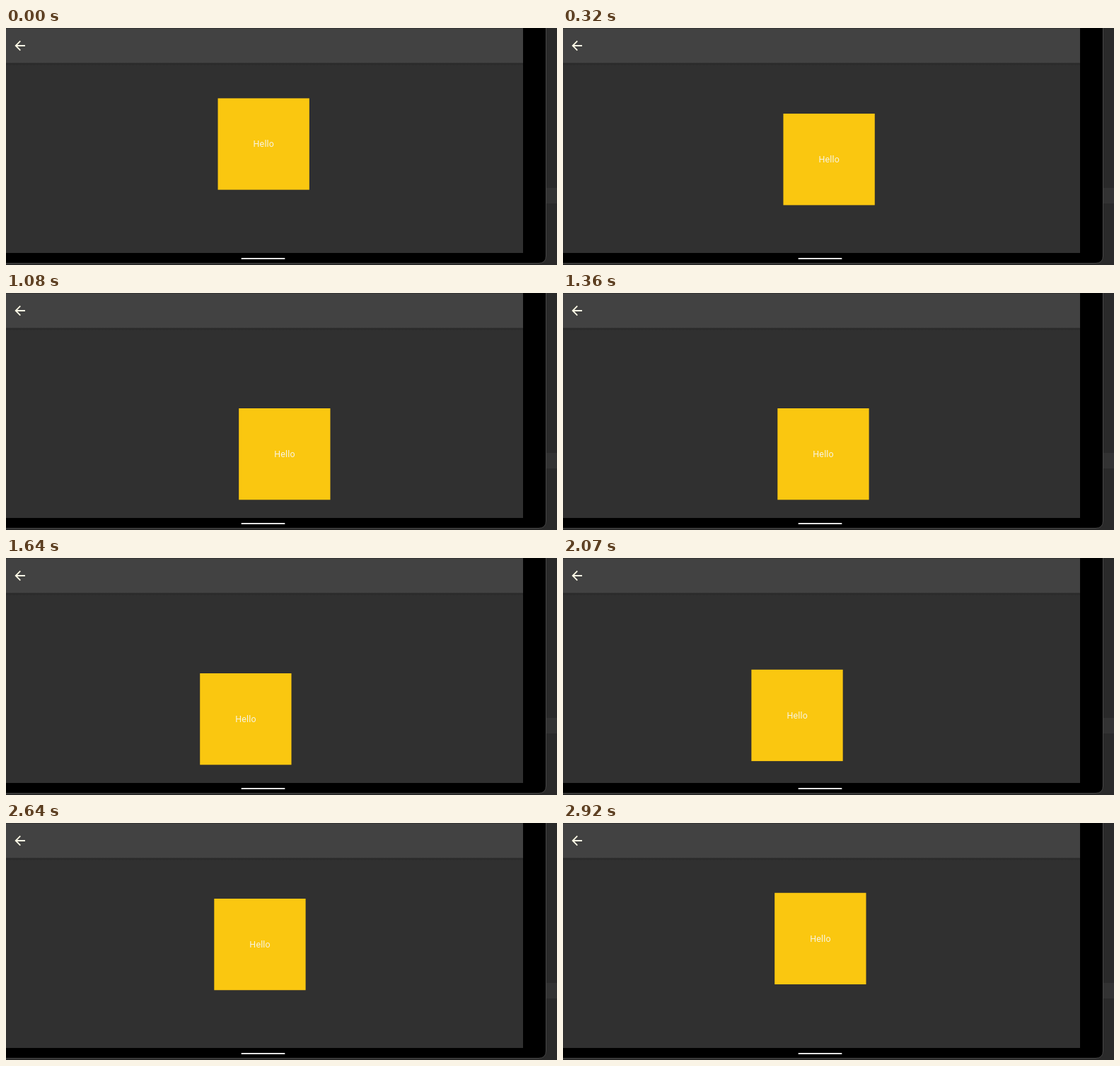
Animation, 779 px wide and 335 px high, one loop 2.95 s. Source, as an HTML page:

```html
<!DOCTYPE html>
<html lang="en">
<head>
<meta charset="utf-8">
<title>Triangle path</title>
<style>
html, body { margin: 0; width: 100%; height: 100%; overflow: hidden; background: #2a2a2a; }
svg { display: block; }
text { font: 12.4px Roboto, sans-serif; letter-spacing: .2px; text-anchor: middle; }
</style>
</head>
<body>
<svg width="779" height="335" viewBox="0 0 779 335">
  <defs>
    <linearGradient id="shade" x2="0" y2="1">
      <stop stop-color="#252525"/>
      <stop offset="1" stop-color="#303030"/>
    </linearGradient>
  </defs>
  <!-- desktop and device -->
  <rect x="764" y="226" width="15" height="22" fill="#333"/>
  <path d="M-5-5H763.5V322Q763.5 332.5 753 332.5H-5Z" fill="#000" stroke="#484848"/>
  <rect width="731" height="318" fill="#303030"/>
  <rect y="49" width="731" height="4" fill="url(#shade)"/>
  <rect width="731" height="49.5" fill="#424242"/>
  <rect width="731" height="1" fill="#333"/>
  <path d="M27 25H14.5M20.3 18.3L13.7 25L20.3 31.7" fill="none" stroke="#fffbe6" stroke-width="1.8"/>
  <rect x="332.5" y="325" width="62" height="1.8" rx=".9" fill="#fff"/>
  <!-- moving box -->
  <g id="box">
    <rect width="129.3" height="129.3" fill="#fac710"/>
    <text x="64.8" y="69" fill="#f7f4e4">Hello</text>
  </g>
</svg>
<script>
const LOOP = 2950, LEAD = 76, LEG = LOOP / 3;
const corners = [[299, 98.4], [334.5, 163], [263.5, 163]];
const box = document.getElementById('box');
const ease = u => (1 - Math.cos(Math.PI * u)) / 2;

function draw(now) {
  const t = (now + LEAD) % LOOP / LEG;
  const leg = Math.floor(t) % 3;
  const from = corners[leg], to = corners[(leg + 1) % 3];
  const k = ease(t % 1);
  const [x, y] = from.map((v, i) => v + (to[i] - v) * k);
  box.setAttribute('transform', `translate(${x} ${y})`);
}

const start = performance.now();
function tick() {
  draw(performance.now() - start);
  requestAnimationFrame(tick);
}
tick();
</script>
</body>
</html>
```
